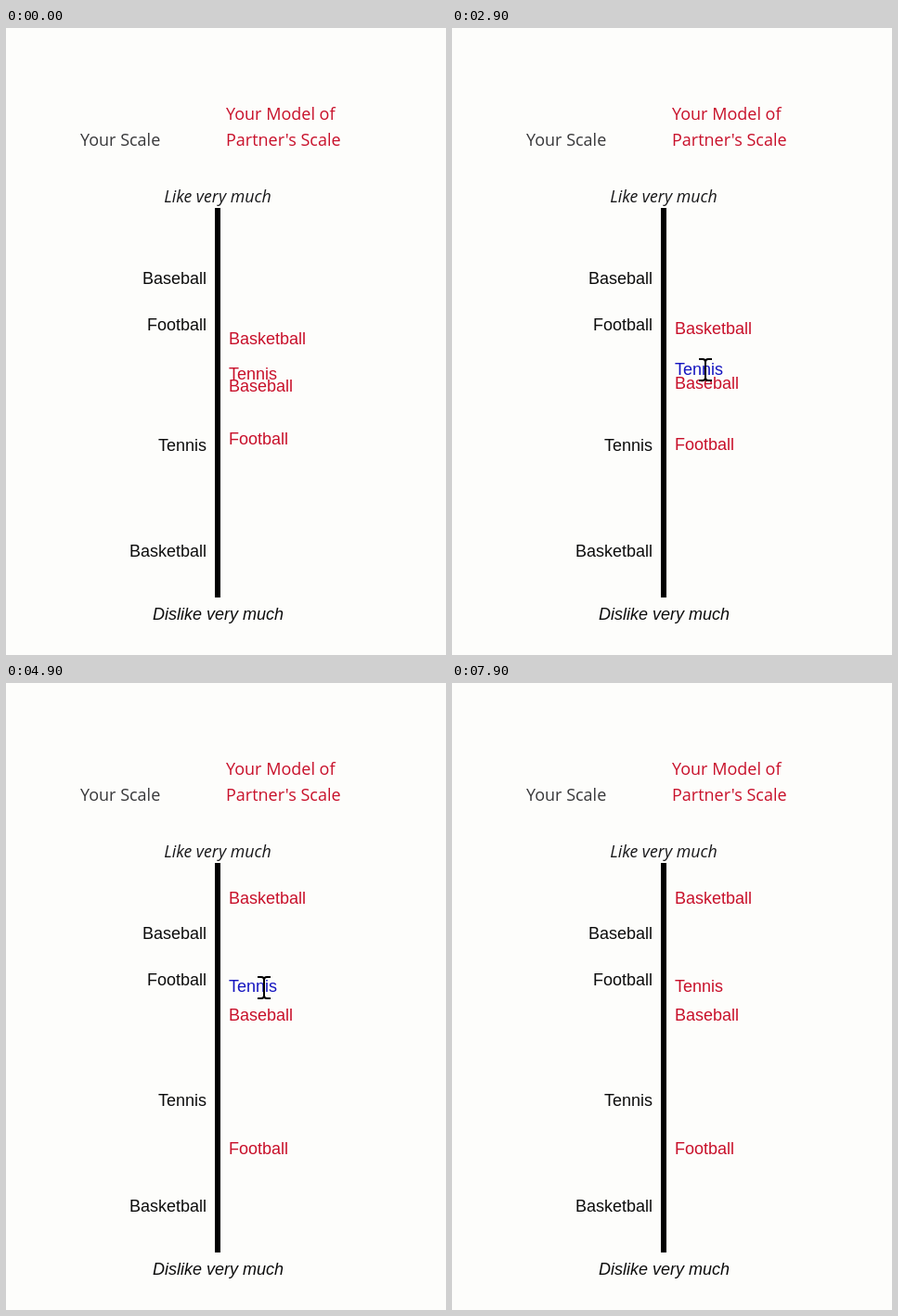
An HTML page for the animation above (8 s loop, 474x676 px).

```html
<!DOCTYPE html>
<html lang="en">
<head>
<meta charset="utf-8">
<title>Preference scale</title>
<style>
  html, body { margin: 0; width: 100%; height: 100%; overflow: hidden; background: #fdfdfb; }
  svg { display: block; width: 474px; height: 676px; }
  text { font: 18px "Liberation Sans", Arial, sans-serif; fill: #0c0c0c; }
  .head { font: 18px "Open Sans", "Noto Sans", sans-serif; fill: #38383a; }
  .mine { text-anchor: end; }
  .model { fill: #c8102a; }
  .held { fill: #1414c0; }
  .end { font-style: italic; text-anchor: middle; }
  .like { font: italic 17.8px "Open Sans", "Noto Sans", sans-serif; fill: #18181a; }
</style>
</head>
<body>
<svg viewBox="0 0 474 676">
  <text class="head" x="80" y="127">Your Scale</text>
  <text class="head model" x="237" y="99">Your Model of</text>
  <text class="head model" x="237" y="127">Partner's Scale</text>
  <text class="end like" x="228" y="188">Like very much</text>
  <rect x="225" y="194" width="6" height="420"/>
  <text class="end" x="228.5" y="638">Dislike very much</text>
  <g id="labels"></g>
  <path id="arrow" d="M0 0V24L5.6 18.9L9.3 27L12.8 25.5L9.2 17.6H16.8Z"
        fill="#fff" stroke="#111"/>
  <path id="beam" d="M-7 -11H-3Q0 -11 0 -8Q0 -11 3 -11H7M0 -8V9M-7 12H-3Q0 12 0 9Q0 12 3 12H7"
        fill="none" stroke="#000" stroke-width="2"/>
</svg>
<script>
const LOOP = 8000, STEP = 100;
const ENTER = 600, NEAR = 1700, GRAB = 1920, DROP = 4900, RELEASE = 5500, LEAVE = 6400, GONE = 7100;
const PRESS = 2600;

// pointer stops along its way
const outside = [480, 715], near = [291, 358], grab = [272, 373], drop = [278, 328], away = [490, 372];

const $ = id => document.getElementById(id);
const lerp = (a, b, p) => a + (b - a) * p;
const mix = (a, b, p) => a.map((v, i) => Math.round(lerp(v, b[i], p)));
const progress = (t, from, to) => Math.min(1, Math.max(0, (t - from) / (to - from)));
const easeIn = p => p * p;

function addLabel(name, x, y, cls) {
  const el = document.createElementNS('http://www.w3.org/2000/svg', 'text');
  el.textContent = name;
  el.setAttribute('class', cls);
  el.setAttribute('x', x);
  setHeight(el, y);
  return $('labels').appendChild(el);
}

function setHeight(el, y) {
  el.setAttribute('y', Math.round(y) + 6);
}

function addMover(name, from, to) {
  return { el: addLabel(name, 240, from, 'model'), from, to };
}

addLabel('Baseball', 216, 270, 'mine');
addLabel('Football', 216, 320, 'mine');
addLabel('Tennis', 216, 450, 'mine');
addLabel('Basketball', 216, 564, 'mine');

const tennis = addMover('Tennis', 373, 327);
const movers = [
  tennis,
  addMover('Basketball', 335, 232),
  addMover('Baseball', 386, 358),
  addMover('Football', 443, 502)
];

function pointerAt(t, pull) {
  if (t < NEAR) return mix(outside, near, progress(t, ENTER, NEAR));
  if (t < GRAB) return mix(near, grab, progress(t, NEAR, GRAB));
  if (t < LEAVE) return mix(grab, drop, pull);
  return mix(drop, away, easeIn(progress(t, LEAVE, GONE)));
}

function draw(time) {
  const t = Math.floor((time % LOOP) / STEP) * STEP;
  const pull = easeIn(progress(t, GRAB, DROP));
  movers.forEach(m => setHeight(m.el, lerp(m.from, m.to, pull)));
  tennis.el.classList.toggle('held', t >= PRESS && t < RELEASE);

  const [x, y] = pointerAt(t, pull);
  const onText = x < 293 && Math.abs(y - lerp(tennis.from, tennis.to, pull)) < 11;
  for (const [id, shown] of [['arrow', !onText], ['beam', onText]]) {
    $(id).setAttribute('transform', `translate(${x} ${y})`);
    $(id).style.display = shown ? '' : 'none';
  }
}

const start = performance.now();
function tick() {
  draw(performance.now() - start);
  requestAnimationFrame(tick);
}
tick();
</script>
</body>
</html>
```
